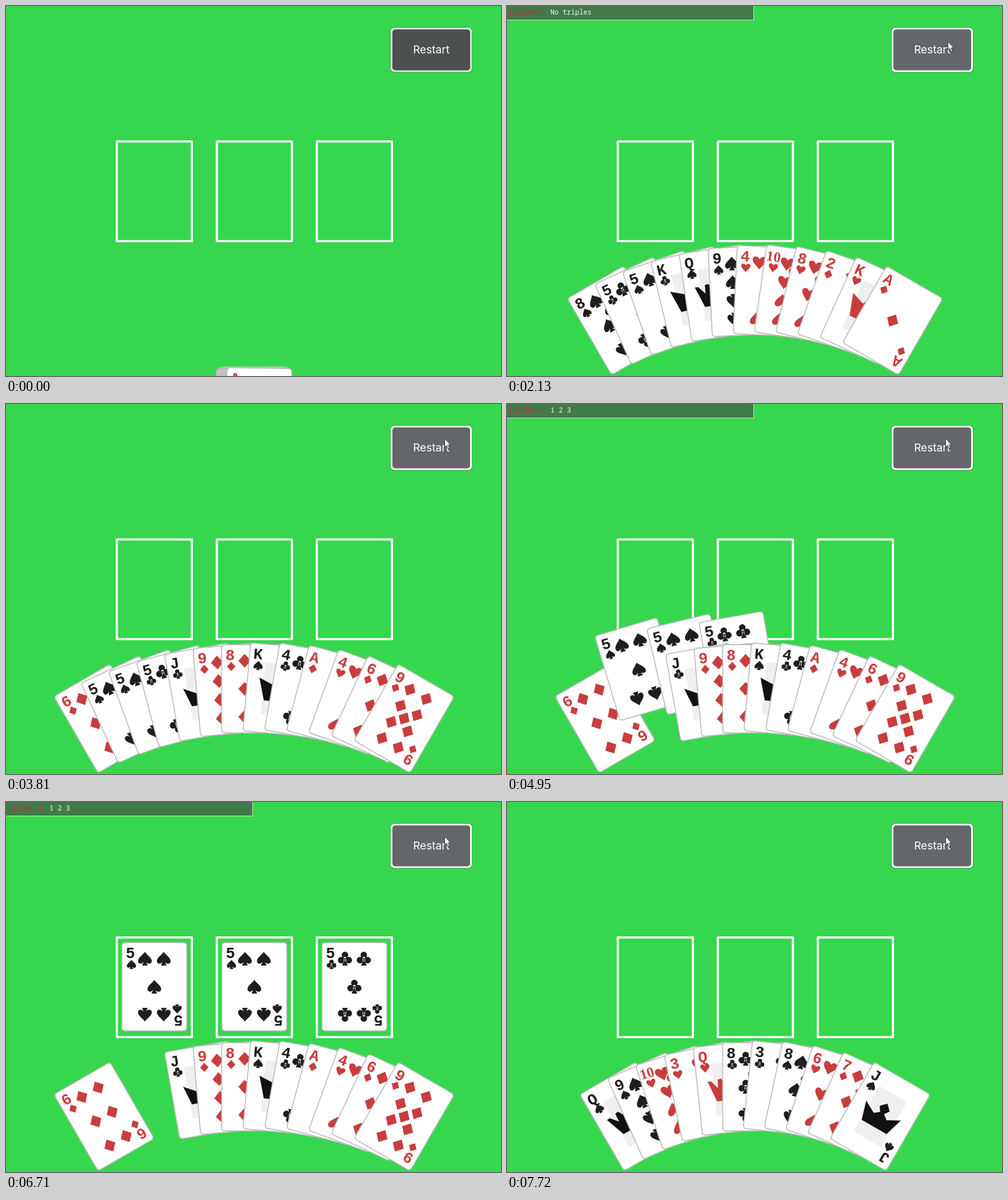
Write an HTML page with a canvas that moves like this. It is 866 by 647 pixels and loops after 8 s.

```html
<!DOCTYPE html>
<html lang="en">
<head>
<meta charset="utf-8">
<title>Card hand</title>
<style>
  html, body { margin: 0; width: 100%; height: 100%; overflow: hidden; background: #36d74e; }
  canvas { display: block; }
</style>
</head>
<body>
<canvas id="stage" width="866" height="647"></canvas>
<script>
const ctx = document.getElementById('stage').getContext('2d');
const LOOP = 8000;
const CENTER_X = 434;
const SLOT_GAP = 175;
const DECK_Y = 716;
const INK = { S: '#1e1e1e', C: '#1e1e1e', H: '#c93d3d', D: '#c93d3d' };

const stem = 'L5 12H-5L-2 5';
const SUITS = {
  S: new Path2D(`M0-12C3-7 12-2 12 4C12 10 5 10 2 6${stem}C-5 10-12 10-12 4C-12-2-3-7 0-12Z`),
  H: new Path2D('M0 12C-4 6-12 1-12-5C-12-12-3-12 0-6C3-12 12-12 12-5C12 1 4 6 0 12Z'),
  D: new Path2D('M0-12L11 0L0 12L-11 0Z'),
  C: new Path2D('M-5.7-6.5a5.7 5.7 0 1 0 11.4 0a5.7 5.7 0 1 0-11.4 0Z' +
    'M-12.4 2.5a5.8 5.8 0 1 0 11.6 0a5.8 5.8 0 1 0-11.6 0Z' +
    'M.8 2.5a5.8 5.8 0 1 0 11.6 0a5.8 5.8 0 1 0-11.6 0Z' +
    `M-2-3H2V5${stem}Z`)
};
const CROWNS = {
  J: new Path2D('M-35-12L-13 0L-4-7L-10-16L0-26L10-16L4-7L13 0L35-12L25 21H-25Z'),
  Q: new Path2D('M-38-15L-32-15L-21-2L-20-17L-14-18L-7-6L-3-24H3L7-6L14-18L20-17L21-2L32-15L38-15L25 21H-25Z'),
  K: new Path2D('M-36-18L-13-8L0-28L13-8L36-18L25 21H-25Z')
};

// Rows of the paired columns, and of the middle column, for each rank
const PAIRS = { 4: [-49, 49], 5: [-49, 49], 6: [-49, 0, 49], 7: [-49, 0, 49], 8: [-49, 0, 49],
  9: [-49, -16.4, 16.4, 49], 10: [-49, -16.4, 16.4, 49] };
const MIDDLES = { A: [0], 2: [-49, 49], 3: [-49, 0, 49], 5: [0], 7: [-25], 8: [-25, 25],
  9: [0], 10: [-33, 33] };

const HANDS = [
  { from: 0, deal: [[-31, 0], [910, 1]], log: 'No triples', logFrom: 1580, logTo: 2910,
    cards: '8S 5C 5S KC QS 9S 4H 10H 8H 2D KH AD'.split(' ') },
  { from: 2910, deal: [[2910, 0], [3420, .567], [3810, 1]], log: '1 2 3', logFrom: 4680, logTo: 6820,
    cards: '6D 5S 5S 5C JC 9D 8D KS 4C AD 4H 6D 9D'.split(' '),
    triple: [1, 2, 3], play: [[4650, 0], [4950, .3333], [5510, .9], [5600, 1]] },
  { from: 6820, deal: [[6820, 0], [7300, .5333], [7720, 1]],
    cards: 'QS 9S 10H 3H QH 8C 3C 8S 6H 7D JS'.split(' ') }
];
const CURSOR_X = [[1790, 862], [1970, 773], [2100, 773], [2130, 771], [2600, 771], [2700, 767]];
const CURSOR_Y = [[1790, 68], [1970, 61], [2100, 61], [2130, 62], [2600, 62], [2700, 60]];

const mix = (a, b, p) => a + (b - a) * p;

function along(keys, t) {
  const next = keys.findIndex(key => key[0] > t);
  if (next === 0) return keys[0][1];
  if (next < 0) return keys[keys.length - 1][1];
  const [t0, a] = keys[next - 1], [t1, b] = keys[next];
  return mix(a, b, (t - t0) / (t1 - t0));
}

// Card moves advance in thirtieths
const stepped = (keys, t) => Math.floor(along(keys, t) * 30 + .1) / 30;

function box(x, y, w, h, r, fill) {
  ctx.beginPath();
  ctx.roundRect(x, y, w, h, r);
  ctx.fillStyle = fill;
  ctx.fill();
}

function label(text, x, y, font, color, align = 'left') {
  ctx.font = font;
  ctx.fillStyle = color;
  ctx.textAlign = align;
  ctx.fillText(text, x, y);
}

function pip(suit, x, y, scale) {
  ctx.save();
  ctx.translate(x, y);
  ctx.scale(scale, y > 0 ? -scale : scale);
  ctx.fill(SUITS[suit]);
  ctx.restore();
}

function drawCard(card, { x, y, angle }) {
  const suit = card.slice(-1), rank = card.slice(0, -1), ink = INK[suit];
  ctx.save();
  ctx.translate(x, y);
  ctx.rotate(angle * Math.PI / 180);
  box(-57.5, -78, 115, 156, 6, '#bcbcbc');
  box(-55.8, -76.3, 111.6, 152.6, 4.5, '#fff');
  if (CROWNS[rank]) {
    ctx.fillStyle = '#efefef';
    ctx.fillRect(-28, -45.5, 56, 91);
    ctx.fillStyle = suit === 'S' || suit === 'C' ? '#111' : ink;
    ctx.fill(CROWNS[rank]);
  }
  ctx.fillStyle = ink;
  for (const row of PAIRS[rank] || []) {
    pip(suit, -16.5, row, 1);
    pip(suit, 16.5, row, 1);
  }
  for (const row of MIDDLES[rank] || []) pip(suit, 0, row, 1);
  const font = rank === '10' ? 'bold 25px "Liberation Serif", serif' : 'bold 27px "Liberation Mono", monospace';
  for (let corner = 0; corner < 2; corner++) {
    label(rank, -42, -50, font, ink, 'center');
    pip(suit, -40, -39, .67);
    ctx.rotate(Math.PI);
  }
  ctx.restore();
}

function cardPose(hand, i, t) {
  const last = hand.cards.length - 1;
  const side = i / last * 2 - 1;
  const dealt = stepped(hand.deal, t);
  const pose = {
    x: CENTER_X + side * last / 2 * SLOT_GAP / 4 * dealt,
    y: mix(DECK_Y, 498 + 52 * side * side, dealt),
    angle: 30 * side * dealt
  };
  const slot = hand.triple ? hand.triple.indexOf(i) : -1;
  if (slot < 0) return pose;
  const played = stepped(hand.play, t);
  return {
    x: mix(pose.x, CENTER_X + (slot - 1) * SLOT_GAP + .5, played),
    y: mix(pose.y, 323, played),
    angle: pose.angle * (1 - played)
  };
}

function drawButton(t) {
  const hover = along([[1850, 0], [1950, 1]], t);
  const shade = (a, b) => Math.round(mix(a, b, hover));
  box(672.5, 37.5, 143, 79, 6, 'rgba(30,70,40,.45)');
  box(673, 38, 142, 77.5, 6, `rgb(${shade(222, 250)},${shade(228, 250)},${shade(222, 250)})`);
  box(676, 41, 136, 71.5, 5, `rgb(${shade(76, 99)},${shade(80, 103)},${shade(80, 106)})`);
  label('Restart', 744, 83, '19px Inter, sans-serif', '#fff', 'center');
}

function drawLog(text) {
  ctx.fillStyle = '#427b48';
  ctx.fillRect(0, 0, 431, 24);
  ctx.fillStyle = '#d5e5d6';
  ctx.fillRect(0, 24, 432, 1);
  ctx.fillRect(431, 0, 1, 25);
  const font = '12px "Noto Sans Mono", monospace';
  label('[Gizmo-7]', 3, 14.5, font, '#c8274b');
  label(text, 76, 14.5, font, '#f4f8f4');
}

function drawCursor(t) {
  if (t < 1790) return;
  ctx.save();
  ctx.translate(along(CURSOR_X, t), along(CURSOR_Y, t));
  const arrow = new Path2D('M.5 .5V15L3.7 12L6.2 18L8.6 17L6.2 11.2H10.5Z');
  ctx.fillStyle = '#fff';
  ctx.strokeStyle = '#333';
  ctx.lineWidth = 1;
  ctx.fill(arrow);
  ctx.stroke(arrow);
  ctx.restore();
}

function draw(t) {
  ctx.fillStyle = '#36d74e';
  ctx.fillRect(0, 0, 866, 647);
  ctx.strokeStyle = '#fff';
  ctx.lineWidth = 3.8;
  ctx.lineJoin = 'round';
  for (let slot = -1; slot <= 1; slot++) {
    ctx.strokeRect(CENTER_X + .5 + slot * SLOT_GAP - 65.7, 236.8, 131.4, 174.4);
  }
  drawButton(t);
  const hand = HANDS.filter(h => t >= h.from).pop();
  hand.cards.forEach((card, i) => drawCard(card, cardPose(hand, i, t)));
  if (t >= hand.logFrom && t < hand.logTo) drawLog(hand.log);
  drawCursor(t);
}

const start = performance.now();
function tick() {
  draw((performance.now() - start) % LOOP);
  requestAnimationFrame(tick);
}
tick();
</script>
</body>
</html>
```
